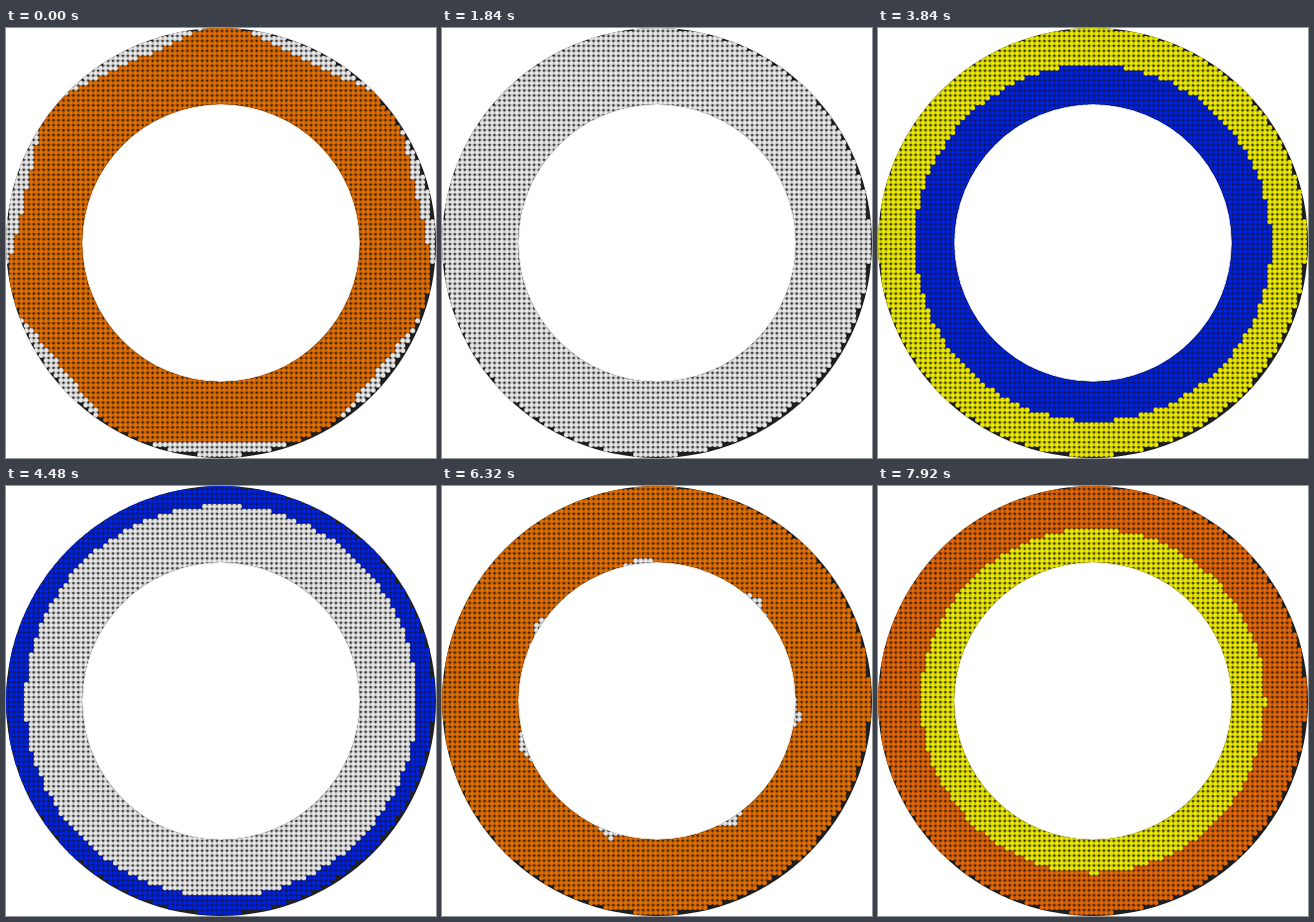
These frames come from a looping animation (434 px wide and 434 px high, 8 s). An HTML page with a canvas:

```html
<!DOCTYPE html>
<html lang="en">
<head>
<meta charset="utf-8">
<title>LED ring</title>
<style>
html, body { margin: 0; width: 100%; height: 100%; overflow: hidden; background: #fff; }
canvas { display: block; width: 434px; height: 434px; }
</style>
</head>
<body>
<canvas id="stage" width="434" height="434"></canvas>
<script>
const ctx = document.getElementById('stage').getContext('2d');
const TAU = Math.PI * 2;
const LOOP = 8000, STEP = 80, CYCLE = 4640;
const MID = 217, HOLE = 140, PITCH = 5, GRID_MID = 215.5, HALF = 43;

const WHITE = [236, 236, 236], AMBER = [230, 112, 0], ORANGE = [232, 104, 6];
const RED = [222, 6, 0], YELLOW = [240, 238, 0], BLUE = [0, 34, 228];
const BANDS = [RED, ORANGE, YELLOW, BLUE, WHITE];

// One lamp per colour, lighter in the middle.
function makeLamp(rgb) {
  const lamp = document.createElement('canvas');
  lamp.width = lamp.height = PITCH;
  const g = lamp.getContext('2d');
  const fill = g.createRadialGradient(2.5, 2.5, 0.8, 2.5, 2.5, 2.6);
  fill.addColorStop(0, `rgb(${rgb})`);
  fill.addColorStop(1, `rgb(${rgb.map(v => Math.round(v * 0.8))})`);
  g.fillStyle = fill;
  g.beginPath();
  g.arc(2.5, 2.5, 2.55, 0, TAU);
  g.fill();
  return lamp;
}
const lamps = new Map([...BANDS, AMBER].map(c => [c, makeLamp(c)]));

const dots = [];
for (let j = -HALF; j <= HALF; j++) {
  for (let i = -HALF; i <= HALF; i++) {
    if (Math.hypot(i, j) > 43.25) continue;
    const dx = GRID_MID + i * PITCH - MID;
    const dy = GRID_MID + j * PITCH - MID;
    const r = Math.hypot(dx, dy);
    if (r > HOLE - 4) dots.push({ dx, dy, r, angle: Math.atan2(dx, -dy) });
  }
}

// Turning heptagon that shrinks into the hole.
function heptagon(step, inner, outer) {
  if (step > 22) return () => outer;
  const inradius = (225.8 - 3.76 * step) * Math.cos(Math.PI / 7);
  const turn = step * 7.03 * Math.PI / 180;
  const side = TAU / 7;
  return dot => {
    const a = (((dot.angle - turn) % side) + side) % side - side / 2;
    return dot.r * Math.cos(a) <= inradius ? inner : outer;
  };
}

// Concentric colours that spread out from the hole.
function waves(step) {
  const lead = 137.6 + 12 * (step - 25);
  return dot => {
    const n = Math.floor((lead - dot.r) / 78);
    return n < 0 ? WHITE : BANDS[Math.min(n, BANDS.length - 1)];
  };
}

function draw(ms) {
  const t = Math.floor(ms / STEP) * STEP;
  const step = (t % CYCLE) / STEP;
  const first = t < CYCLE;
  const pick = step < 25
    ? heptagon(step, first ? AMBER : WHITE, first ? WHITE : AMBER)
    : waves(step);

  ctx.fillStyle = '#fff';
  ctx.fillRect(0, 0, 434, 434);
  ctx.save();
  ctx.beginPath();
  ctx.arc(MID, MID, MID, 0, TAU);
  ctx.moveTo(MID + HOLE, MID);
  ctx.arc(MID, MID, HOLE, 0, TAU);
  ctx.clip('evenodd');
  ctx.fillStyle = '#202020';
  ctx.fillRect(0, 0, 434, 434);
  for (const dot of dots) {
    ctx.drawImage(lamps.get(pick(dot)), MID + dot.dx - 2.5, MID + dot.dy - 2.5);
  }
  ctx.restore();
}

const start = performance.now();
function tick() {
  draw((performance.now() - start) % LOOP);
  requestAnimationFrame(tick);
}
tick();
</script>
</body>
</html>
```
